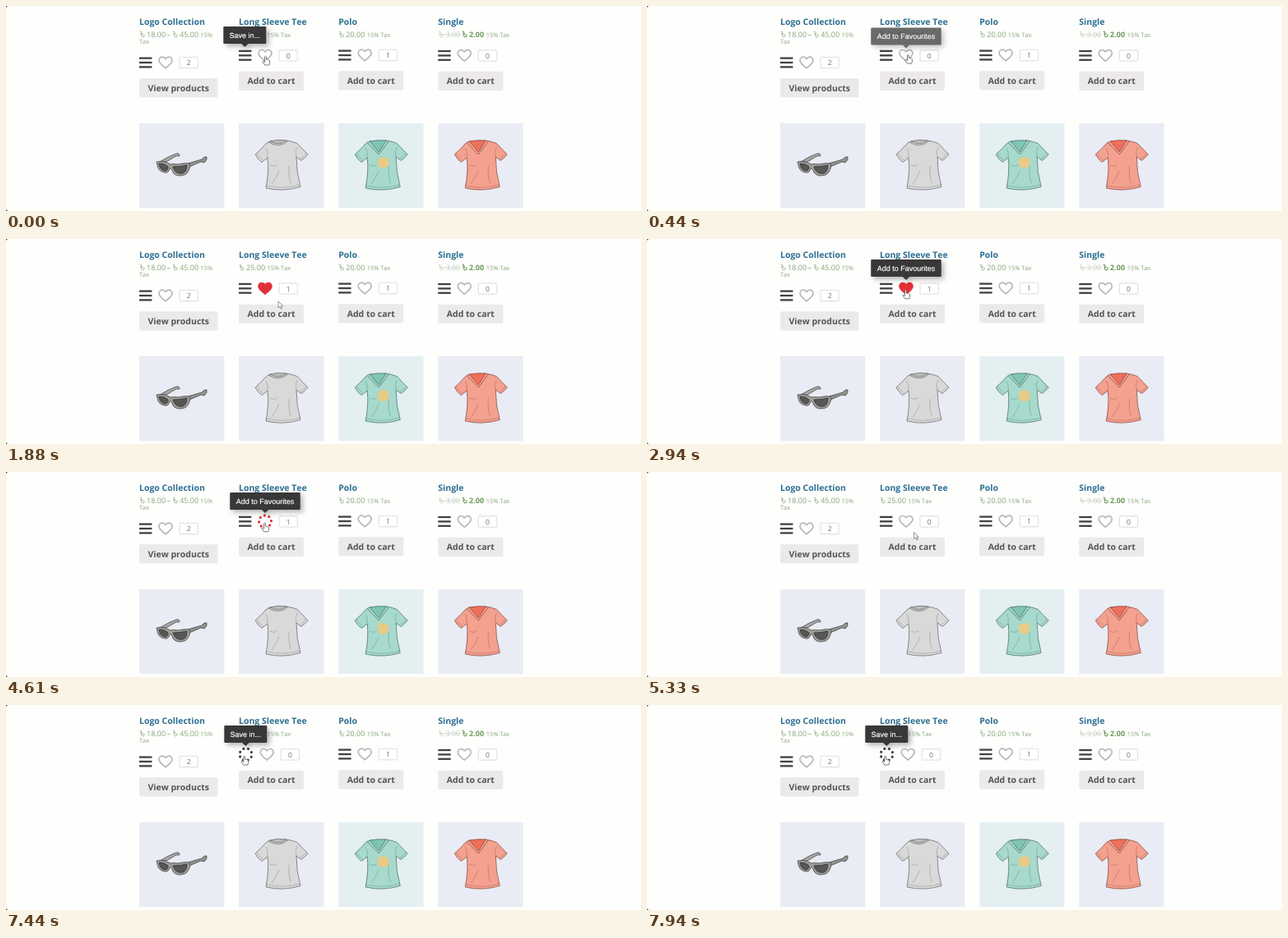
Recreate the animation shown at these times as an HTML page. Size 772 by 250 pixels, loop 8000 ms.

```html
<!DOCTYPE html>
<html lang="en">
<head>
<meta charset="utf-8">
<title>Product grid</title>
<style>
  html, body { margin: 0; width: 100%; height: 100%; overflow: hidden; background: #fefefd; }
  svg { display: block; width: 772px; height: 250px; text-rendering: geometricPrecision; }
  text { font-family: "Open Sans", sans-serif; font-kerning: none; white-space: pre; }
  .title { font-size: 10.5px; font-weight: 700; fill: #2b6f92; }
  .price { font-size: 9px; fill: #83a574; }
  .tax { font-size: 7.4px; fill: #83a574; }
  .old { fill: #c6cdc2; }
  .sale { font-weight: 700; fill: #6b9a57; }
  .taka { fill: none; stroke: #8ba67e; stroke-width: .8; }
  .taka.old, .strike { stroke: #c6cdc2; }
  .taka.old, .taka.sale { fill: none; }
  .taka.sale { stroke: #6b9a57; stroke-width: 1.1; }
  .count { font-size: 8.6px; fill: #707070; text-anchor: middle; }
  .btn { font-size: 10.5px; font-weight: 700; fill: #555; }
  .tip text { font: 9px "Liberation Sans", Arial, sans-serif; fill: #fff; stroke: #fff; stroke-width: .2; text-anchor: middle; }
  .tip { filter: drop-shadow(3px 3px 3px rgba(0, 0, 0, .3)); }
</style>
</head>
<body>
<svg id="stage" viewBox="0 0 772 250"></svg>
<script>
const LOOP = 8000;
const GREY = '#b8b8b8', RED = '#e23038', DARK = '#424242';

const at = (x, y, body, attrs = '') => `<g transform="translate(${x} ${y})" ${attrs}>${body}</g>`;
const text = (x, y, cls, s) => `<text x="${x}" y="${y}" class="${cls}">${s}</text>`;
const path = (d, attrs = '') => `<path d="${d}" ${attrs}/>`;

// Icons, centred on their own origin
const bars = [-5.4, 0, 5.4]
  .map(y => `<rect x="-7.7" y="${y - 1.15}" width="15.4" height="2.3" fill="${DARK}"/>`).join('');

const heart = (fill, stroke, id = '') => path(
  'M0 6.8C-3 4.2-8 .8-8-2.6C-8-5.3-6-6.8-4-6.8C-2.2-6.8-.8-5.8 0-4.4' +
  'C.8-5.8 2.2-6.8 4-6.8C6-6.8 8-5.3 8-2.6C8 .8 3 4.2 0 6.8Z',
  `${id} fill="${fill}" stroke="${stroke}" stroke-width="1.7" stroke-linejoin="round"`);

const dots = Array.from({ length: 8 }, (_, i) => {
  const a = i * Math.PI / 4;
  return `<circle cx="${(7.4 * Math.cos(a)).toFixed(2)}" cy="${(7.4 * Math.sin(a)).toFixed(2)}" r="1.6"/>`;
}).join('');

const counter = (n, id = '') =>
  '<rect x="-11.2" y="-6.6" width="22.4" height="13.4" rx="1.5" fill="#fff" stroke="#e6e6e6" stroke-width="1.4"/>' +
  `<text ${id} y="3.4" class="count">${n}</text>`;

// Prices
const taka = (x, cls = '') => at(x, 31, path(
  'M0 .4Q1.6-.4 2 1.2V5.4Q2.1 7 3.5 7Q5.4 6.9 5.4 5Q5.3 3.6 4 3.8M.3 3H3.6', `class="taka ${cls}"`));
const amount = (x, n, cls = '') => taka(x, cls) + text(x + 8.4, 38, `price ${cls}`, n);
const tax = x => text(x, 38, 'tax', '15% Tax');

const prices = [
  amount(.7, '18.00') + text(33.6, 38, 'price', '–') + amount(40.8, '45.00') +
    text(74.6, 38, 'tax', '15%') + text(0, 46.3, 'tax', 'Tax'),
  amount(.7, '25.00') + tax(34.6),
  amount(.7, '20.00') + tax(34.6),
  amount(.7, '3.00', 'old') + path('M1 35H26.5', 'class="strike" stroke-width=".8"') +
    amount(29.4, '2.00', 'sale') + tax(58.4)
];

// Product pictures, inside a 103px tile
function shades() {
  const lens = 'fill="#575757" stroke="#333" stroke-width=".8"';
  return '<g stroke="#4a4a4a" stroke-width=".8" stroke-linejoin="round">' +
    path('M25 47Q36 40 45 37Q49 36 49 40Q46 39 43 41L33 47Z', 'fill="#a8a8a4"') +
    path('M59 49L76 44Q79 40 82 41Q83 45 79 48L75 47L61 53Z', 'fill="#92928e"') +
    path('M21 47Q29 45 38 50Q42 49 47 50Q56 48 61 49L62 52Q60 61 55 63Q45 66 41 60Q39 54 37 55' +
      'Q36 61 31 60Q23 59 22 51Z', 'fill="#9d9d98"') + '</g>' +
    path('M24 49Q31 49 35 53Q35 58 31 58Q25 57 24 49Z', lens) +
    path('M41 53Q50 53 58 51Q58 59 53 61Q44 63 41 53Z', lens);
}

function shirt(fill, line, inner, vneck) {
  const neck = vneck
    ? path('M38 22Q48 20 58 21L49 35Z', `fill="${inner}"`) + path('M35 23.5L49 38L61 22')
    : path('M38 22Q48 19 58 21Q49 28 38 22Z', `fill="${inner}"`) + path('M36 23Q49 31 60 21.5');
  return `<g fill="none" stroke="${line}" stroke-width=".8" stroke-linejoin="round">` +
    path('M38 22Q35 23 33 25Q27 32 20 38Q23 44 28 47.5L35 42Q37 58 33 79Q54 84 75 77.5Q70 60 70 41' +
      'L76 45.5Q81 42 84 38Q77 31 71 24.5Q65 22 58 21Q48 23 38 22Z', `fill="${fill}"`) +
    neck +
    path('M22 37Q25 42 29.5 45M74.5 43.5Q79 41 82 36.5M34 76Q54 81 74 75M35 42Q36 35 33 30M70 41Q68 34 71 29' +
      'M40 74Q46 66 49 58M63 73Q60 64 61 52M38 51Q44 54 47 50', 'stroke-width=".6" opacity=".6"') +
    '</g>';
}

const pictures = [
  shades(),
  shirt('#d9d9d9', '#6f6f6f', '#bdbdbd', false),
  shirt('#a7dacd', '#4f746c', '#7fc4b4', true) + '<circle cx="54.5" cy="48" r="7" fill="#e9cb86"/>',
  shirt('#f4a18f', '#8d4c42', '#ee705b', true)
];

const TILE = '#e9ecf4';
const products = [
  { name: 'Logo Collection', x: 162, icons: 69, btn: 88.2, label: 'View products', w: 95.5, n: 2, tile: TILE },
  { name: 'Long Sleeve Tee', x: 283, icons: 60.3, btn: 79.7, label: 'Add to cart', w: 79, n: 0, tile: TILE, live: true },
  { name: 'Polo', x: 404.2, icons: 60, btn: 79.2, label: 'Add to cart', w: 79, n: 1, tile: '#e4eff2' },
  { name: 'Single', x: 525.3, icons: 60.4, btn: 79.8, label: 'Add to cart', w: 79, n: 0, tile: TILE }
];

function card(p, i) {
  const id = name => p.live ? `id="${name}"` : '';
  const spin = name => p.live ? `<g id="${name}">${dots}</g>` : '';
  return at(p.x, 0,
    text(0, 23, 'title', p.name) + prices[i] +
    at(7.7, p.icons, `<g ${id('bars')}>${bars}</g>`) +
    at(8.5, p.icons, spin('listSpin')) +
    `<g ${id('wish')}>` +
      at(32, p.icons, heart('none', GREY, id('heart')) + spin('heartSpin')) +
      at(60.2, p.icons, counter(p.n, id('count'))) + '</g>' +
    `<rect y="${p.btn}" width="${p.w}" height="23.2" rx="2" fill="#ece9eb"/>` +
    text(10.5, p.btn + 15.3, 'btn', p.label) +
    at(0, 143, `<rect width="103.3" height="103.3" fill="${p.tile}"/>` + pictures[i]));
}

const tooltip = (id, w, label) =>
  `<g id="${id}" class="tip"><rect x="${-w / 2}" y="25" width="${w}" height="21" rx="1" fill="#383838"/>` +
  path('M-4.5 45.8H4.5L0 50Z', 'fill="#383838"') + `<text y="38.8">${label}</text></g>`;

const outline = 'fill="#fff" stroke-linejoin="round"';
const pointers =
  path('M-.9 .9Q0-.5 .9 .9V4.1L2.6 4.4L4.1 5L5.1 6V8.5L4.2 11H-.9L-3.4 7.3Q-3.6 5.9-2.2 6.4L-.9 7.5Z',
    `id="hand" stroke="#555" stroke-width=".8" ${outline}`) +
  path('M0 0V8.2L1.8 6.5L3.2 9.6L4.5 9L3.2 6H5.6Z',
    `id="arrow" stroke="#777" stroke-width=".8" ${outline}`);

const stage = document.getElementById('stage');
stage.innerHTML =
  '<rect width="772" height="250" fill="#fefefd"/>' +
  path('M0 0H3Q0 0 0 3ZM0 250H3Q0 250 0 247Z', 'fill="#222"') +
  products.map(card).join('') +
  tooltip('saveTip', 52, 'Save in...') + tooltip('favTip', 85.5, 'Add to Favourites') +
  `<g id="cursor">${pointers}</g>`;

const el = Object.fromEntries([...stage.querySelectorAll('[id]')].map(e => [e.id, e]));

// Timeline
const clamp = v => Math.min(1, Math.max(0, v));
const ease = v => v * v * (3 - 2 * v);
const ramp = (t, a, b) => ease(clamp((t - a) / (b - a)));
const within = (t, a, b) => t >= a && t < b;

// [time, x, y] of the pointer tip
const route = [
  [50, 315.5, 61], [500, 317.5, 59], [1000, 317.5, 59], [1450, 331, 75.8],
  [2330, 331, 75.8], [2680, 314.5, 61.8], [4600, 314.5, 61.8], [5050, 324.7, 73.3],
  [5940, 324.7, 73.3], [6330, 290, 64.6], [6500, 289.6, 62]
];

function pointerAt(t) {
  let prev = route[0];
  for (const next of route) {
    if (t < next[0]) {
      const k = ramp(t, prev[0], next[0]);
      return [prev[1] + (next[1] - prev[1]) * k, prev[2] + (next[2] - prev[2]) * k];
    }
    prev = next;
  }
  return prev.slice(1);
}

const show = (node, on) => node.setAttribute('visibility', on ? 'visible' : 'hidden');
const move = (node, x, y) => node.setAttribute('transform', `translate(${x} ${y})`);

function showTip(node, x, k) {
  node.setAttribute('opacity', k);
  move(node, x, 6 * (1 - k));
}

function render(t) {
  const listBusy = t >= 7440;
  const adding = within(t, 770, 1880);
  const removing = within(t, 4440, 5270);
  const liked = within(t, 1880, 5270);
  const turn = `rotate(${t * .36 % 360})`;

  show(el.bars, !listBusy);
  show(el.listSpin, listBusy);
  el.listSpin.setAttribute('fill', DARK);
  el.listSpin.setAttribute('transform', turn);
  move(el.wish, listBusy ? 2.2 : 0, 0);

  show(el.heart, !adding && !removing);
  el.heart.setAttribute('fill', liked ? RED : 'none');
  el.heart.setAttribute('stroke', liked ? RED : GREY);
  show(el.heartSpin, adding || removing);
  el.heartSpin.setAttribute('fill', liked ? RED : GREY);
  el.heartSpin.setAttribute('transform', turn);
  el.count.textContent = liked ? 1 : 0;

  showTip(el.saveTip, listBusy ? 291.3 : 290.3, 1 - ramp(t, 50, 350) + ramp(t, 6265, 6570));
  showTip(el.favTip, 315,
    ramp(t, 200, 560) - ramp(t, 1190, 1490) + ramp(t, 2580, 2900) - ramp(t, 4900, 5200));

  const [x, y] = pointerAt(t);
  const onIcon = y < 68.5 && (x < 299 || x > 306);
  move(el.cursor, x, y);
  show(el.hand, onIcon);
  show(el.arrow, !onIcon);
}

const start = performance.now();
function tick() {
  render((performance.now() - start) % LOOP);
  requestAnimationFrame(tick);
}
tick();
</script>
</body>
</html>
```
